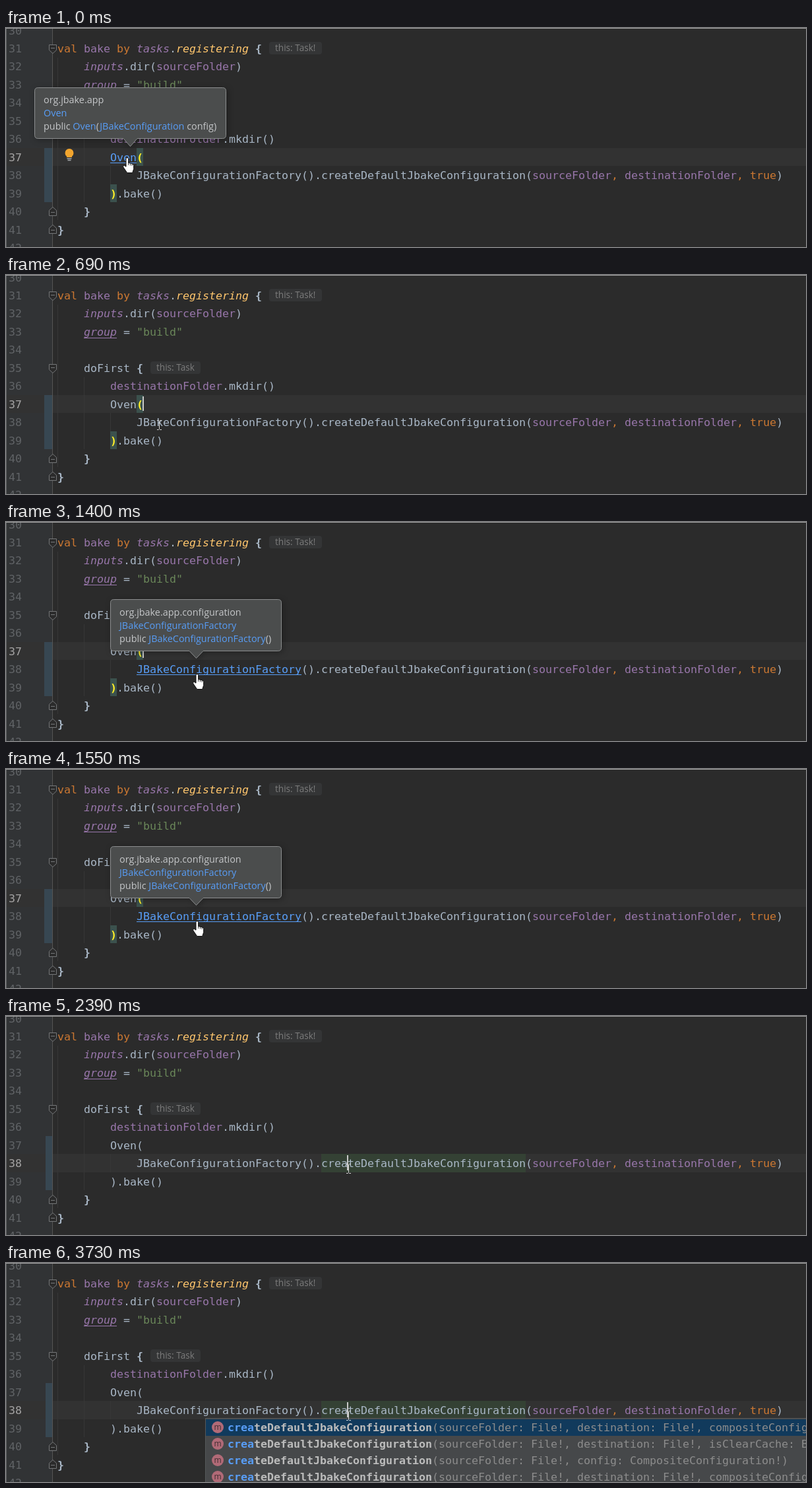
Write an HTML page that moves like this. It is 1213 px wide and 332 px high and loops after 3.88 s.

```html
<!DOCTYPE html>
<html lang="en">
<head>
<meta charset="utf-8">
<title>Code navigation in an editor</title>
<style>
html, body { margin: 0; width: 100%; height: 100%; overflow: hidden; background: #2b2b2b; }
svg { display: block; width: 1213px; height: 332px; }
text { font: 16.61px "DejaVu Sans Mono", monospace; white-space: pre; fill: #a9b7c6; }
.kw { fill: #cc7832; }
.prop { fill: #9876aa; }
.str { fill: #6a8759; }
.fn { fill: #ffc66d; }
.it { font-style: italic; }
.b { font-weight: bold; }
.num text { fill: #606366; }
.guide { stroke: #373737; }
.fold { fill: #2b2b2b; stroke: #757779; }
.hint rect { fill: #343536; }
.hint text { font: 13.6px "Open Sans", "Noto Sans", sans-serif; fill: #7c7c7c; }
.tip path { fill: #4b4d4d; stroke: #8c8e8f; filter: drop-shadow(2px 2px 5px rgba(0, 0, 0, .3)); }
.tip text { font: 14.4px "Open Sans", "Noto Sans", sans-serif; fill: #c4c6c8; }
.tip .link { fill: #589df6; }
.list text { fill: #8c8c8c; }
.list .name { fill: #bbb; font-weight: bold; }
.list .hit { fill: #589df6; }
.list circle { fill: #b16a77; }
.list .m { font: 12px "Open Sans", "Noto Sans", sans-serif; fill: #3a2a2e; text-anchor: middle; }
.caret { fill: #c8c8c8; }

/* all state changes are hard cuts on one shared clock */
.t { animation: 3880ms step-end infinite; }
.intro { animation-name: intro; }
.early { animation-name: early; }
.late { animation-name: late; }
.over { animation-name: over; }
.tip2 { animation-name: tip2; }
.caret1 { animation-name: caret1; }
.caret2 { animation-name: caret2; }
.list { animation-name: list; }
.hand { animation-name: hand; }
.beam { animation-name: beam; }
.oven { animation-name: oven; }
.factory { animation-name: factory; }
.brace { animation-name: brace; }
.num .n37 { animation-name: n37; }
.num .n38 { animation-name: n38; }

@keyframes intro { 0% { visibility: visible } 17.783% { visibility: hidden } }
@keyframes early { 0% { visibility: visible } 61.597% { visibility: hidden } }
@keyframes late { 0% { visibility: hidden } 61.597% { visibility: visible } }
@keyframes over { 0%, 51.03% { visibility: hidden } 21.649% { visibility: visible } }
@keyframes tip2 { 0%, 51.03% { visibility: hidden } 36.082% { visibility: visible } }
@keyframes caret1 {
  0%, 14.432%, 39.948%, 61.597% { visibility: hidden }
  3.35%, 17.783%, 51.03% { visibility: visible }
}
@keyframes caret2 { 0%, 82.474% { visibility: hidden } 61.597%, 96.134% { visibility: visible } }
@keyframes list { 0% { visibility: hidden } 82.474% { visibility: visible } }
@keyframes hand {
  0% { visibility: visible; transform: translate(177px, 196px) }
  14.432% { visibility: visible; transform: translate(190px, 197px) }
  17.783% { visibility: hidden; transform: translate(190px, 197px) }
  21.649% { visibility: visible; transform: translate(282px, 229px) }
  25.515% { visibility: visible; transform: translate(283px, 230px) }
  51.03% { visibility: hidden; transform: translate(283px, 230px) }
}
@keyframes beam {
  0% { visibility: hidden; transform: translate(232px, 219px) }
  17.783% { visibility: visible; transform: translate(232px, 219px) }
  21.649% { visibility: hidden; transform: translate(340px, 226px) }
  51.03% { visibility: visible; transform: translate(340px, 226px) }
  54.123% { visibility: visible; transform: translate(483px, 226px) }
  57.989% { visibility: visible; transform: translate(519px, 223px) }
}
@keyframes oven { 0% { fill: #589df6 } 17.783% { fill: #a9b7c6 } }
@keyframes factory { 0%, 51.03% { fill: #a9b7c6 } 21.649% { fill: #589df6 } }
@keyframes brace {
  0% { fill: #ffef28; font-weight: bold }
  61.597% { fill: #a9b7c6; font-weight: normal }
}
@keyframes n37 { 0% { fill: #a4a3a3 } 61.597% { fill: #606366 } }
@keyframes n38 { 0% { fill: #606366 } 61.597% { fill: #a4a3a3 } }
</style>
</head>
<body>
<svg viewBox="0 0 1213 332">
  <defs>
    <path id="open" class="fold" d="M-5.5 -6.5h11v8l-5.5 5l-5.5 -5zM-3 -1.5h6"/>
    <path id="close" class="fold" d="M-5.5 6.5h11v-8l-5.5 -5l-5.5 5zM-3 1.5h6"/>
  </defs>

  <rect width="70" height="332" fill="#313335"/>
  <rect class="t early" y="182" width="1213" height="27" fill="#323232"/>
  <rect class="t late" y="209" width="1213" height="28" fill="#323232"/>
  <g fill="#374752">
    <rect x="60" y="182" width="10" height="82"/>
    <rect class="t early" x="58" y="182" width="2" height="82"/>
  </g>
  <path class="guide" d="M78.5 45V291M118.5 155V264M158.5 209V237"/>
  <path d="M70.5 0V332" stroke="#555"/>

  <g class="num">
    <text x="4" y="10">30</text>
    <text x="4" y="37">31</text>
    <text x="4" y="64">32</text>
    <text x="4" y="92">33</text>
    <text x="4" y="119">34</text>
    <text x="4" y="147">35</text>
    <text x="4" y="174">36</text>
    <text x="4" y="202" class="t n37">37</text>
    <text x="4" y="229" class="t n38">38</text>
    <text x="4" y="257">39</text>
    <text x="4" y="284">40</text>
    <text x="4" y="312">41</text>
    <text x="4" y="339">42</text>
  </g>

  <use href="#open" x="71" y="32"/>
  <use href="#open" x="71" y="142"/>
  <use href="#close" x="71" y="278"/>
  <use href="#close" x="71" y="305"/>

  <g class="t early" fill="#3b514d">
    <rect x="198" y="182" width="10" height="27"/>
    <rect x="158" y="237" width="10" height="27"/>
  </g>
  <rect class="t late" x="478" y="209" width="310" height="28" fill="#344134"/>

  <text x="78" y="37"><tspan class="kw">val</tspan> <tspan class="prop">bake</tspan> <tspan class="kw">by</tspan> <tspan class="prop it">tasks</tspan>.<tspan class="fn it">registering</tspan> <tspan class="b">{</tspan></text>
  <text x="118" y="64"><tspan class="prop it">inputs</tspan>.dir(<tspan class="prop">sourceFolder</tspan>)</text>
  <text x="118" y="92"><tspan class="prop it">group</tspan> = <tspan class="str">"build"</tspan></text>
  <path d="M118 95.5h50" stroke="#9876aa"/>
  <text x="118" y="147">doFirst <tspan class="b">{</tspan></text>
  <text x="158" y="174"><tspan class="prop">destinationFolder</tspan>.mkdir()</text>
  <text x="158" y="202"><tspan class="t oven">Oven</tspan><tspan class="t brace">(</tspan></text>
  <text x="198" y="229"><tspan class="t factory">JBakeConfigurationFactory</tspan>().createDefaultJbakeConfiguration(<tspan class="prop">sourceFolder</tspan><tspan class="kw">,</tspan> <tspan class="prop">destinationFolder</tspan><tspan class="kw">, true</tspan>)</text>
  <text x="158" y="257"><tspan class="t brace">)</tspan>.bake()</text>
  <text x="118" y="284" class="b">}</text>
  <text x="78" y="312" class="b">}</text>

  <g class="hint">
    <rect x="399" y="21" width="80" height="19" rx="4"/>
    <text x="408" y="35">this: Task!</text>
    <rect x="219" y="131" width="76" height="19" rx="4"/>
    <text x="228" y="145">this: Task</text>
  </g>

  <path class="t intro" d="M158 204.5h40" stroke="#589df6"/>
  <path class="t over" d="M198 231.5h250" stroke="#589df6"/>
  <rect class="caret t caret1" x="207" y="184" width="2" height="22"/>
  <rect class="caret t caret2" x="517" y="211" width="2" height="23"/>

  <g class="t intro">
    <path d="M92 196v-1.5a6.5 6.5 0 1 1 8 0v1.5z" fill="#f2a52e"/>
    <path d="M92.5 198h7M93.5 200.5h5" stroke="#a9acae" stroke-width="1.5"/>
  </g>

  <g class="tip t intro">
    <path d="M48.5 90.5H328.5q5 0 5 5V162.5q0 5 -5 5H199l-10.5 12l-10.5 -12H48.5q-5 0 -5 -5V95.5q0 -5 5 -5z"/>
    <text x="57" y="114">org.jbake.app</text>
    <text x="57" y="134" class="link">Oven</text>
    <text x="57" y="154">public <tspan class="link">Oven</tspan>(<tspan class="link">JBakeConfiguration</tspan> config)</text>
  </g>

  <g class="tip t tip2">
    <path d="M163.5 117.5H412.5q5 0 5 5V190.5q0 5 -5 5H299l-10.5 11l-10.5 -11H163.5q-5 0 -5 -5V122.5q0 -5 5 -5z"/>
    <text x="172" y="142">org.jbake.app.configuration</text>
    <text x="172" y="162" class="link">JBakeConfigurationFactory</text>
    <text x="172" y="182">public <tspan class="link">JBakeConfigurationFactory</tspan>()</text>
  </g>

  <g class="list t">
    <rect x="302.5" y="235.5" width="920" height="110" fill="#46484a" stroke="#55585a"/>
    <rect x="303" y="237" width="910" height="25" fill="#113a5c"/>
    <g id="rows"></g>
  </g>

  <path d="M.5 0V332" stroke="#606264"/>
  <path d="M0 .5H1213" stroke="#a0a0a0"/>

  <g class="t hand" stroke="#111">
    <path d="M5 2.5q0 -2 1.8 -2t1.8 2V8.5l5.4 1.2q2.7 .7 2.7 3V17.500l-2 6h-8L.8 14.8q-.8 -2.600 1.700 -2.400l2.500 1.800z" fill="#fff"/>
    <path d="M8.600 8.500v3.500M11.400 9.500v3M14 10v3" stroke-width=".8"/>
  </g>
  <path class="t beam" d="M-3 1.500h2.500l1 1l1 -1H4M.5 2.500V14M-3 15.500h2.500l1 -1l1 1H4" fill="none" stroke="#d8d8d8"/>
</svg>
<script>
const params = [
  "destination: File!, compositeConfiguration: CompositeConfiguration!",
  "destination: File!, isClearCache: Boolean",
  "config: CompositeConfiguration!",
  "destination: File!, compositeConfiguration: CompositeConfiguration!"
];
document.getElementById("rows").innerHTML = params.map((rest, i) => {
  const y = 249 + 25 * i;
  return `<circle cx="321" cy="${y}" r="9"/><text class="m" x="321" y="${y + 4}">m</text>
    <text x="336" y="${y + 6}"><tspan class="name hit">crea</tspan><tspan class="name">teDefaultJbakeConfiguration</tspan>(sourceFolder: File!, ${rest})</text>`;
}).join("");
</script>
</body>
</html>
```
